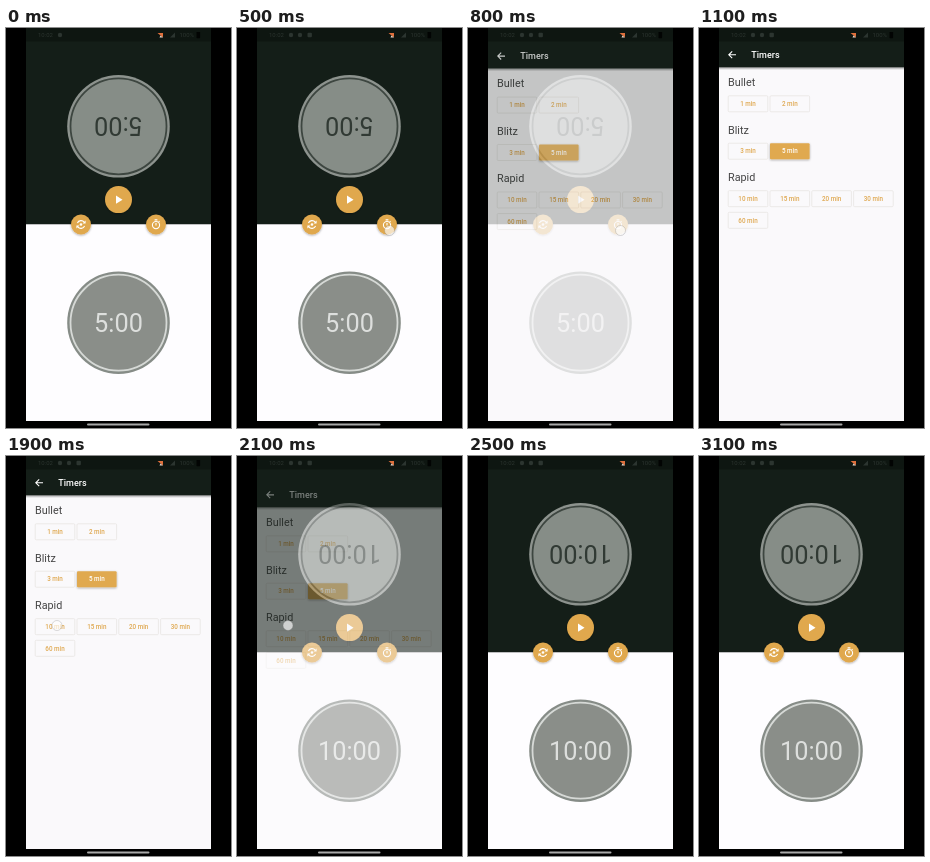
Animation of 225x400 px, one loop 3400 ms. Source, as an HTML page:

```html
<!DOCTYPE html>
<html lang="en">
<head>
<meta charset="utf-8">
<title>Chess clock</title>
<style>
  html, body { margin: 0; width: 100%; height: 100%; overflow: hidden; background: #000; }
  svg { display: block; width: 100vw; height: 100vh; font-family: Roboto, sans-serif; }
  .time { font-size: 25.3px; text-anchor: middle; }
  .head { font-size: 10.8px; fill: #454545; }
  .label { font-size: 6.3px; font-weight: 500; text-anchor: middle; }
  .line { fill: none; stroke: #fff; stroke-width: 1.1; }
</style>
</head>
<body>
<svg viewBox="0 0 225 400">
  <defs>
    <clipPath id="screen"><path d="M20 0H205V393H20Z"/></clipPath>
    <linearGradient id="fall" x2="0" y2="1">
      <stop stop-color="#000" stop-opacity=".4"/>
      <stop offset="1" stop-color="#000" stop-opacity="0"/>
    </linearGradient>
    <filter id="soft" x="-30%" y="-30%" width="160%" height="160%">
      <feDropShadow dx="0" dy=".8" stdDeviation=".8" flood-opacity=".35"/>
    </filter>
  </defs>
  <path d="M0 0H225V400H0Z"/>
  <g clip-path="url(#screen)">
    <path d="M20 0H205V196.3H20Z" fill="#141e18"/>
    <path d="M20 196.3H205V393H20Z" fill="#fefdff"/>

    <g transform="rotate(180 112.5 98.3)">
      <circle cx="112.5" cy="98.3" r="51.3" fill="#8d938e"/>
      <circle cx="112.5" cy="98.3" r="48" fill="#868d87" stroke="#3d4640" stroke-width="1.8"/>
      <text class="time" x="112.5" y="107.3" fill="#313a34"></text>
    </g>
    <circle cx="112.5" cy="294.7" r="51.3" fill="#868c87"/>
    <circle cx="112.5" cy="294.7" r="48" fill="#8a8e89" stroke="#d6d9d6" stroke-width="1.8"/>
    <text class="time" x="112.5" y="303.7" fill="#dddfdd"></text>

    <g fill="#e0a84e" filter="url(#soft)">
      <circle cx="112.5" cy="171.6" r="13.5"/>
      <circle cx="75" cy="196.5" r="10"/>
      <circle cx="150" cy="196.5" r="10"/>
    </g>
    <path d="M110 167.6V175.8L116.5 171.7Z" fill="#fff"/>
    <g transform="translate(75 196.5)">
      <path class="line" d="M-3.6 -1.5A4 4 0 0 1 3.2 -2.4M3.6 1.5A4 4 0 0 1 -3.2 2.4"/>
      <path d="M4.6 -4V-.9H1.5ZM-4.6 4V.9H-1.5Z" fill="#fff"/>
      <circle r="1.3" fill="#fff"/>
    </g>
    <g transform="translate(150 196.5)">
      <circle class="line" cy=".6" r="3.6"/>
      <path class="line" d="M-1.4 -4.6H1.4M0 -1.6V1M2.7 -2.5L3.5 -3.3"/>
    </g>

    <g id="page">
      <path d="M20 0H205V400H20Z" fill="#faf9fb"/>
      <path d="M20 39H205V42H20Z" fill="url(#fall)"/>
      <path d="M20 0H205V39.3H20Z" fill="#141e18"/>
      <path class="line" d="M37 26.8H30M33.2 23.4L29.8 26.8L33.2 30.2"/>
      <text x="52.3" y="30" font-size="9" font-weight="500" fill="#fff">Timers</text>
    </g>

    <path d="M20 0H205V13.5H20Z" fill="#0e1611"/>
    <g fill="#2c3530" font-size="6">
      <text x="32" y="9.2">10:02</text>
      <circle cx="54" cy="7" r="2.2"/>
      <g id="notes"><circle cx="63" cy="7" r="2.2"/><rect x="70.5" y="4.8" width="4.4" height="4.4" rx="1"/></g>
      <path d="M164 9.5H169V4.5Z"/>
      <text x="173.5" y="9.2">100%</text>
    </g>
    <path d="M151.5 5H157V9.5Z" fill="#e0703c"/>
    <path d="M154.5 7.4L157 9.5H153.5Z" fill="#e9d8cc"/>
    <rect x="190.5" y="4" width="3.6" height="6.2" rx=".6" fill="#020403"/>
    <circle id="dot" r="5" fill="#fff" stroke="#777" stroke-width=".7" stroke-opacity=".6"/>
  </g>
  <rect x="81" y="395.4" width="62.5" height="2" rx="1" fill="#a9a9a9"/>
</svg>
<script>
const LOOP = 3400, STEP = 100;      // the screen refreshes ten times a second
const OPEN = 545, CLOSE = 1980, SLIDE = 300, RISE = 97;
const TAPS = [
  { from: 400, to: 900, x: 152.5, y: 202.5 },
  { from: 1900, to: 2500, x: 51, y: 169.5 }
];
const GROUPS = [
  ["Bullet", 58.2, [1, 2]],
  ["Blitz", 105.6, [3, 5]],
  ["Rapid", 153.1, [10, 15, 20, 30, 60]]
];
const $ = id => document.getElementById(id);
const page = $("page"), dot = $("dot"), notes = $("notes");
const times = document.querySelectorAll(".time");

function add(tag, attrs, text = "") {
  const el = document.createElementNS("http://www.w3.org/2000/svg", tag);
  for (const k in attrs) el.setAttribute(k, attrs[k]);
  el.textContent = text;
  page.append(el);
}

for (const [name, base, mins] of GROUPS) {
  add("text", { class: "head", x: 29, y: base }, name);
  mins.forEach((m, i) => {
    const on = m === 5;
    const x = 29.2 + (i % 4) * 41.8, y = base + 9.6 + Math.floor(i / 4) * 21.6;
    add("rect", {
      x, y, width: 39.6, height: 16, rx: 1, "stroke-width": .7,
      fill: on ? "#e0a94f" : "none", stroke: on ? "none" : "#e5e2e0",
      ...(on && { filter: "url(#soft)" })
    });
    add("text", { class: "label", x: x + 19.8, y: y + 10.2, fill: on ? "#fff" : "#dfa850" }, m + " min");
  });
}

function bezier(x1, y1, x2, y2) {
  const at = (a, b, s) => 3 * a * s * (1 - s) ** 2 + 3 * b * s * s * (1 - s) + s ** 3;
  return x => {
    let lo = 0, hi = 1;
    for (let i = 0; i < 24; i++) {
      const mid = (lo + hi) / 2;
      if (at(x1, x2, mid) < x) lo = mid; else hi = mid;
    }
    return at(y1, y2, lo);
  };
}
const slide = bezier(.4, 0, .2, 1), fade = bezier(.42, 0, 1, 1);
const clamp = v => Math.max(0, Math.min(1, v));

function draw(t) {
  const p = t < CLOSE ? clamp((t - OPEN) / SLIDE) : 1 - clamp((t - CLOSE) / SLIDE);
  page.setAttribute("transform", `translate(0 ${RISE * (1 - slide(p))})`);
  page.setAttribute("opacity", p === 1 ? 1 : p && fade(p));
  times.forEach(el => el.textContent = t < CLOSE ? "5:00" : "10:00");
  notes.setAttribute("opacity", t < 100 ? 0 : 1);

  const tap = TAPS.find(a => t >= a.from && t < a.to);
  dot.setAttribute("opacity", tap ? .65 : 0);
  if (tap) dot.setAttribute("transform", `translate(${tap.x} ${tap.y})`);
}

const start = performance.now();
function tick() {
  const t = (performance.now() - start) % LOOP;
  draw(Math.floor(t / STEP) * STEP);
  requestAnimationFrame(tick);
}
tick();
</script>
</body>
</html>
```
